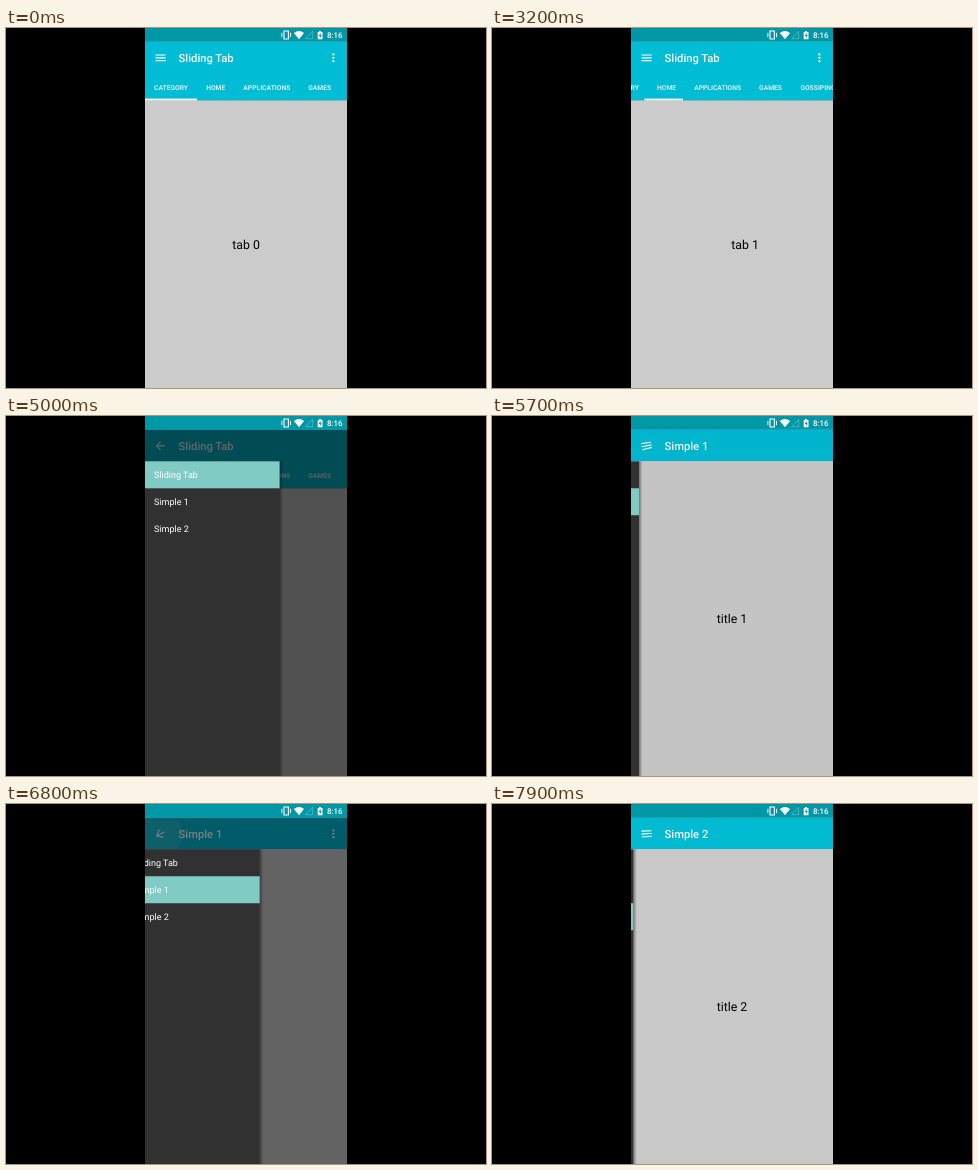
Write an HTML page that moves like this. It is 480 by 360 pixels and loops after 8000 ms.

```html
<!DOCTYPE html>
<html lang="en">
<head>
<meta charset="utf-8">
<title>Sliding tabs and drawer</title>
<style>
  html, body { margin: 0; width: 100%; height: 100%; overflow: hidden; background: #000; }
  svg { display: block; }
  text { font-family: Roboto, sans-serif; text-rendering: geometricPrecision; }
  .title { font-size: 11.2px; font-weight: 500; fill: #fff; }
  .tab { font-size: 6.73px; font-weight: 700; fill: #fff; fill-opacity: .82; text-anchor: middle; }
  .page { font-size: 12.35px; text-anchor: middle; }
  .item { font-size: 9px; fill: #fff; }
  .clock { font-size: 7.9px; font-weight: 500; fill: #fff; }
</style>
</head>
<body>
<svg width="480" height="360" viewBox="0 0 480 360">
  <defs>
    <linearGradient id="edge">
      <stop offset="0" stop-color="#000" stop-opacity=".4"/>
      <stop offset="1" stop-color="#000" stop-opacity="0"/>
    </linearGradient>
    <clipPath id="barClip"><rect y="13.5" width="202" height="31.8"/></clipPath>
  </defs>
  <rect width="480" height="360" fill="#000"/>
  <svg x="139" width="202" height="360">
    <rect width="202" height="360" fill="#cbcbcb"/>

    <g id="tabScreen">
      <g id="pages"></g>
      <rect y="45" width="202" height="27.4" fill="#00bcd4"/>
      <rect y="71.6" width="202" height=".9" fill="#777" fill-opacity=".25"/>
      <g id="strip"><rect id="indicator" y="70.6" height="1.9" fill="#fff"/></g>
    </g>
    <text id="simplePage" class="page" x="101" y="207.2"></text>

    <g clip-path="url(#barClip)">
      <rect y="13" width="202" height="32.3" fill="#00bcd4"/>
      <circle id="ripple" cx="15.6" cy="29.8" fill="#fff"/>
    </g>
    <path id="arrow" fill="none" stroke="#fff" stroke-width="1.15"/>
    <text id="title" class="title" x="33.6" y="34"></text>
    <g id="dots" fill="#fff">
      <circle cx="188.4" cy="26.4" r="1.15"/>
      <circle cx="188.4" cy="29.8" r="1.15"/>
      <circle cx="188.4" cy="33.2" r="1.15"/>
    </g>

    <rect id="scrim" y="13.5" width="202" height="346.5" fill="#000"/>

    <g id="drawer">
      <rect y="45.3" width="134.6" height="315" fill="#313131"/>
      <rect x="134.6" y="45.3" width="3.5" height="315" fill="url(#edge)"/>
      <rect id="selected" width="134.6" height="27" fill="#80cbc4"/>
    </g>

    <rect width="202" height="13.7" fill="#0097a7"/>
    <g fill="#fff">
      <path d="M139 3h4.400v8h-4.400z" fill="none" stroke="#fff" stroke-width="1.1"/>
      <path d="M136.900 4.800v4.400M145.500 4.800v4.400" stroke="#fff" stroke-width=".9"/>
      <path d="M154 11.300L148.900 4.900Q154 1.200 159.100 4.900Z"/>
      <path d="M160.600 10.700H167.700V3.400Z" fill="none" stroke="#fff" stroke-opacity=".4" stroke-width=".7"/>
      <path d="M172.700 3.900h1.400v-.9h2v.9h1.400v7.400h-4.800z"/>
      <path d="M175.600 4.800l-1.900 3.200h1.200v2.300l1.800-3.300h-1.100z" fill="#0097a7"/>
    </g>
    <text class="clock" x="181.900" y="10.100">8:16</text>
  </svg>
</svg>
<script>
const LOOP = 8000, STEP = 100, WIDTH = 202, DP = WIDTH / 360;
const DRAWER = 240 * DP, ROW = 48 * DP, BAR_BOTTOM = 45.3;
const TABS = ['CATEGORY', 'HOME', 'APPLICATIONS', 'GAMES', 'GOSSIPING'];
const LEFTS = [0, 52, 89.4, 154.2, 195.2, 249];
const SCREENS = ['Sliding Tab', 'Simple 1', 'Simple 2'];

const SLOW_SWIPE = [.02, .065, .25, .55, .8, .92, .97, .99, 1];
const FAST_SWIPE = [.06, .28, .6, .85, .94, .98, .995, 1];
const OPENING = [0, .06, .34, .65, .852, .96, 1];
const CLOSING = [1, .95, .62, .23, .06, .018, 0];

// [start, from, to, progress per step]
const swipes = [
  [100, 0, 1, SLOW_SWIPE],
  [1000, 1, 2, FAST_SWIPE],
  [2200, 2, 1, SLOW_SWIPE],
  [3100, 1, 0, SLOW_SWIPE]
];
const slides = [
  [4400, 0, 1, OPENING],
  [5300, 0, 1, CLOSING],
  [6400, 0, 1, OPENING],
  [7400, 0, 1, CLOSING]
];

const $ = id => document.getElementById(id);
const lerp = (a, b, p) => a + (b - a) * p;
const set = (node, attrs) => {
  for (const key in attrs) node.setAttribute(key, attrs[key]);
};
const show = (node, on) => set(node, { visibility: on ? 'visible' : 'hidden' });

function addText(parent, cls, x, y, label) {
  const node = document.createElementNS('http://www.w3.org/2000/svg', 'text');
  set(node, { class: cls, x, y });
  node.textContent = label;
  return parent.appendChild(node);
}

function valueAt(track, t) {
  const move = track.filter(m => t >= m[0]).pop();
  if (!move) return 0;
  const [start, from, to, curve] = move;
  const step = Math.min(Math.floor((t - start) / STEP), curve.length - 1);
  return lerp(from, to, curve[step]);
}

TABS.forEach((name, i) => addText($('strip'), 'tab', (LEFTS[i] + LEFTS[i + 1]) / 2, 62, name));
[0, 1, 2].forEach(i => addText($('pages'), 'page', WIDTH * (i + .5), 221, 'tab ' + i));
SCREENS.forEach((name, i) => addText($('drawer'), 'item', 16 * DP, BAR_BOTTOM + ROW * (i + .5) + 3.3, name));

function drawTabs(pos) {
  const i = Math.floor(pos), part = pos - i;
  const left = lerp(LEFTS[i], LEFTS[i + 1], part);
  const right = lerp(LEFTS[i + 1], LEFTS[i + 2], part);
  const limit = LEFTS[TABS.length] - WIDTH;
  const scroll = Math.max(0, Math.min(limit, left - 24 * DP));
  set($('indicator'), { x: left, width: right - left });
  set($('strip'), { transform: `translate(${-scroll})` });
  set($('pages'), { transform: `translate(${-pos * WIDTH})` });
}

// Three bars fold into an arrow while the whole icon makes a half turn.
function drawArrow(p, closing) {
  const angle = p * Math.PI / 4, cut = .707 * DP;
  const head = lerp(18, 11.3, p) * DP, shaft = lerp(18, 16, p) * DP;
  const dx = head * Math.cos(angle), dy = head * Math.sin(angle);
  const gap = lerp(5 * DP, -cut, p), x = -shaft / 2;
  const turn = lerp(closing ? 180 : -180, 0, p);
  set($('arrow'), {
    d: `M${x + cut * p} 0h${shaft - 2 * cut * p}M${x} ${gap}l${dx} ${dy}M${x} ${-gap}l${dx} ${-dy}`,
    transform: `translate(15.6 29.8) rotate(${turn})`
  });
}

function drawRipple(t) {
  const age = Math.min((t - (t < 6400 ? 4400 : 6400)) / STEP, 6);
  const live = age >= 0 && age < 6;
  set($('ripple'), {
    r: live ? Math.min(22, 9 + 4 * age) : 0,
    opacity: live ? .3 * (1 - age / 6) : 0
  });
}

function draw(t) {
  const screen = t < 5300 ? 0 : t < 7400 ? 1 : 2;
  const open = valueAt(slides, t);
  const closing = (t >= 5000 && t < 6000) || t >= 7000;

  drawTabs(valueAt(swipes, t));
  show($('tabScreen'), screen === 0);
  $('simplePage').textContent = screen ? 'title ' + screen : '';
  $('title').textContent = SCREENS[screen];
  show($('dots'), !closing);
  drawArrow(open, closing);
  drawRipple(t);

  set($('scrim'), { opacity: .6 * open });
  set($('drawer'), { transform: `translate(${(open - 1) * DRAWER})` });
  show($('drawer'), open > 0);
  set($('selected'), { y: BAR_BOTTOM + ROW * screen });
}

const began = performance.now();
function tick() {
  const t = (performance.now() - began) % LOOP;
  draw(Math.floor(t / STEP) * STEP);
  requestAnimationFrame(tick);
}
tick();
</script>
</body>
</html>
```
